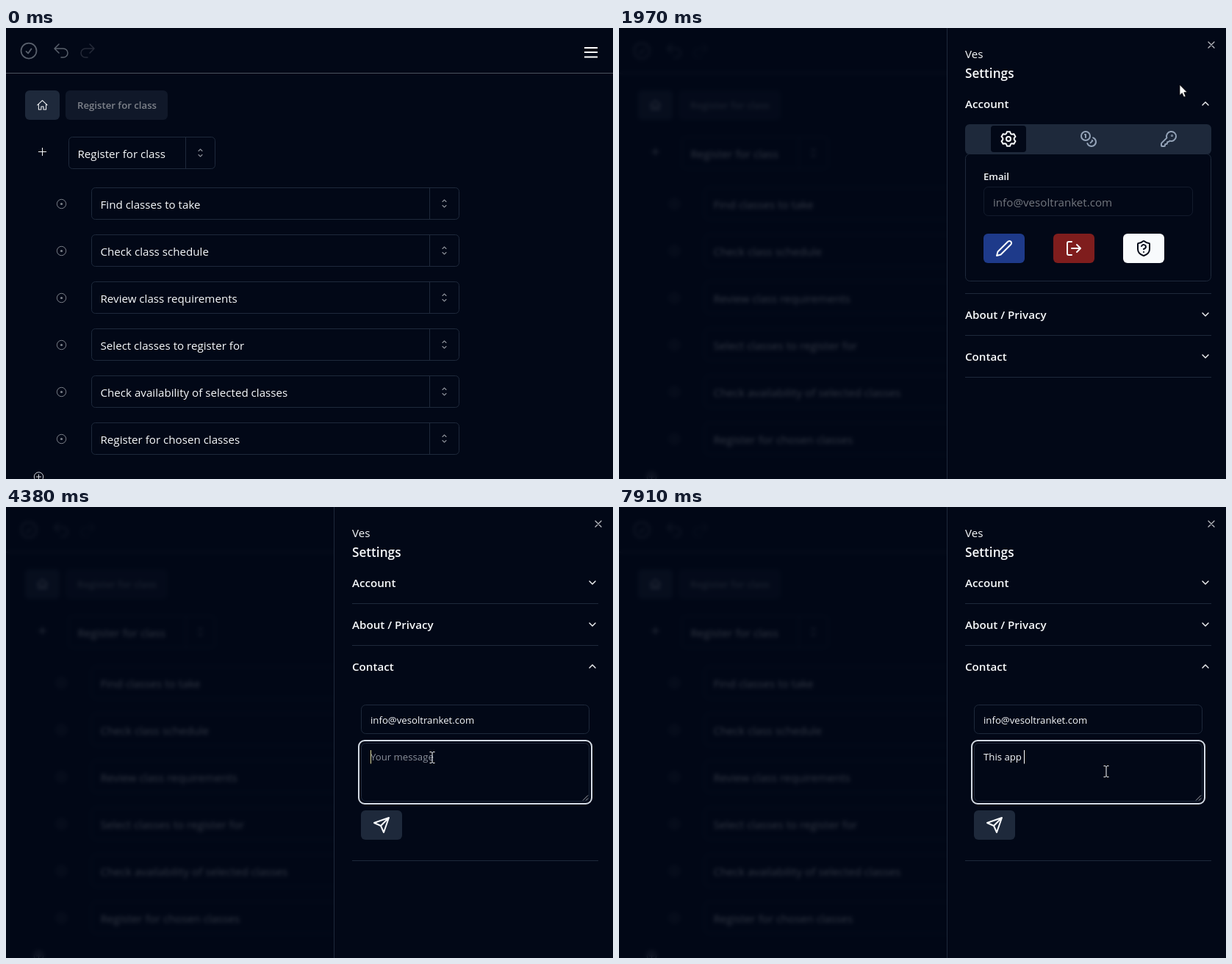
These frames come from a looping animation (826 px wide and 614 px high, 8 s). An HTML page:

```html
<!DOCTYPE html>
<html lang="en">
<head>
<meta charset="utf-8">
<title>Settings panel</title>
<style>
  html, body { margin: 0; width: 100%; height: 100%; overflow: hidden; background: #020817; }
  svg.layer, #overlay { position: absolute; left: 0; top: 0; width: 826px; height: 614px; }
  #overlay { background: rgba(2, 8, 23, .8); backdrop-filter: blur(2.5px); opacity: 0; }
  text { font: 15.15px "Open Sans", "Noto Sans", sans-serif; fill: #f8fafc; white-space: pre; }
  .bold { font-weight: 600; }
  .title { font-size: 17.2px; }
  .small { font-size: 13.2px; }
  .muted { fill: #8a909b; }
  .dim { fill: #73777f; }
  .icon { fill: none; stroke: #f8fafc; stroke-width: 2; stroke-linecap: round; stroke-linejoin: round; }
  .thin { stroke-width: 1.5; }
  .rule { fill: none; stroke: #1e293b; }
  .panel { fill: #020817; }
  .chip { fill: #1e293b; }
</style>
</head>
<body>
<svg class="layer" viewBox="0 0 826 614">
  <rect class="panel" width="826" height="614"/>
  <path d="M0 61.5H826" stroke="#4d525e"/>
  <g class="icon thin" style="stroke:#59606c">
    <path transform="translate(17 17) scale(1.167)" d="M9 12.75 11.25 15 15 9.75M21 12a9 9 0 1 1-18 0 9 9 0 0 1 18 0Z"/>
    <path transform="translate(63 19)" d="M9 15 3 9l6-6M3 9h12a6 6 0 0 1 0 12h-3"/>
    <path transform="translate(123 19) scale(-1 1)" opacity=".4" d="M9 15 3 9l6-6M3 9h12a6 6 0 0 1 0 12h-3"/>
  </g>
  <path d="M787 27H805M787 33H805M787 39.5H805" stroke="#fff" stroke-width="2"/>
  <rect class="chip" x="26" y="85" width="47" height="40" rx="6"/>
  <path class="icon thin" transform="translate(41.3 96.8) scale(.68)" d="M2.2 12 12 2.7 21.8 12M4.5 9.8V21h5.2v-6h4.6v6h5.2V9.8"/>
  <g opacity=".5">
    <rect class="chip" x="81" y="85" width="139" height="40" rx="6"/>
    <text class="bold small" x="97" y="110">Register for class</text>
  </g>
  <path d="M44 168.5H55M49.5 163V174" stroke="#f8fafc"/>
  <g id="rows"></g>
  <g fill="none" stroke="#d5d8dd">
    <circle cx="44.5" cy="611" r="6.2"/>
    <path d="M41 611H48M44.5 607.5V614"/>
  </g>
</svg>

<div id="overlay"></div>

<svg class="layer" viewBox="0 0 826 614">
  <defs>
    <clipPath id="accountClip"><rect id="accountBody" x="446" y="131" width="380" height="230"/></clipPath>
    <clipPath id="contactClip"><rect id="contactBody" x="446" y="245" width="380" height="236"/></clipPath>
    <path id="chevron" class="icon" d="M-4-2 0 2 4-2" style="stroke-width:1.4"/>
    <path id="arrow" d="M0 0V14.6L3.3 11.5 5.7 17 8.2 15.9 5.9 10.6H10.3Z" fill="#fff" stroke="#000" stroke-width=".8"/>
    <path id="hand" d="M-1.5 1.2a1.5 1.5 0 0 1 3 0V8.2c.4-1.6 2.9-1.4 3 .3.5-1.2 2.8-1 2.9.6.6-1 2.8-.8 2.9 1V14.5c0 2-1.3 3.3-1.5 6H0C-.5 18-3.6 15.2-5 12.2c-.8-1.8 1.4-2.8 2.4-1.4l1.1 1.6z" fill="#fff" stroke="#000" stroke-width=".8"/>
    <path id="beam" d="M-3.5-7.5h2.5l1 1 1-1h2.5M0-7V7M-3.5 7.5h2.5l1-1 1 1h2.5" fill="none" stroke="#fff"/>
  </defs>
  <g id="sheet">
    <rect class="panel" x="446" width="380" height="614"/>
    <path class="rule" d="M446.5 0V614"/>
    <path class="icon" d="M802 19l8 8M810 19l-8 8" style="stroke-width:1.3" opacity=".75"/>
    <text x="471" y="41">Ves</text>
    <text class="bold title" x="471" y="68">Settings</text>
    <text class="bold" x="471" y="109">Account</text>
    <g transform="translate(798 103)"><use id="accountChevron" href="#chevron"/></g>

    <g clip-path="url(#accountClip)">
      <rect class="chip" x="471" y="131" width="335" height="41" rx="6"/>
      <rect class="panel" x="506" y="133" width="48" height="36" rx="4"/>
      <g class="icon" transform="translate(530 151)"><path id="gear"/><circle r="3"/></g>
      <g class="icon" style="stroke:#94a3b8">
        <g transform="translate(627 139)">
          <circle cx="8" cy="8" r="6"/>
          <path d="M18.09 10.37A6 6 0 1 1 10.34 18M7 6h1v4M16.71 13.88l.7.71-2.82 2.82"/>
        </g>
        <g transform="translate(736 139)">
          <path d="M2.6 17.4A2 2 0 0 0 2 18.8V21a1 1 0 0 0 1 1h3a1 1 0 0 0 1-1v-1a1 1 0 0 1 1-1h1a1 1 0 0 0 1-1v-1a1 1 0 0 1 1-1h.2a2 2 0 0 0 1.4-.6l.8-.8a6.5 6.5 0 1 0-4-4z"/>
          <circle cx="16.5" cy="7.5" r=".5"/>
        </g>
      </g>
      <rect class="rule panel" x="471.5" y="171.5" width="334" height="173" rx="6" style="fill:#020817"/>
      <text class="bold small" x="496" y="207">Email</text>
      <rect class="rule" x="496.5" y="216.5" width="284" height="39" rx="6" opacity=".6"/>
      <text class="dim" x="509" y="243">info@vesoltranket.com</text>
      <rect x="496" y="280" width="56" height="40" rx="6" fill="#1e3a8a"/>
      <rect x="591" y="280" width="56" height="40" rx="6" fill="#7f1d1d"/>
      <rect x="686" y="280" width="56" height="40" rx="6" fill="#f8fafc"/>
      <g class="icon">
        <path transform="translate(512 288)" d="M17 3a2.85 2.83 0 1 1 4 4L7.5 20.5 2 22l1.5-5.5Z"/>
        <path transform="translate(607 288)" d="M9 21H5a2 2 0 0 1-2-2V5a2 2 0 0 1 2-2h4M16 17l5-5-5-5M21 12H9"/>
        <path transform="translate(702 288)" stroke="#020817" style="stroke:#020817" d="M20 13c0 5-3.5 7.5-7.7 9a1 1 0 0 1-.6 0C7.5 20.5 4 18 4 13V6a1 1 0 0 1 1-1c2 0 4.5-1.2 6.2-2.7a1.2 1.2 0 0 1 1.6 0C14.5 3.8 17 5 19 5a1 1 0 0 1 1 1zM9.1 9a3 3 0 0 1 5.8 1c0 2-3 3-3 3M12 17h.01"/>
      </g>
    </g>

    <g id="lower">
      <path class="rule" d="M471 131.5H806M471 188.5H806"/>
      <text id="about" class="bold" x="471" y="166">About / Privacy</text>
      <use href="#chevron" x="798" y="160"/>
      <text id="contact" class="bold" x="471" y="223">Contact</text>
      <g transform="translate(798 217)"><use id="contactChevron" href="#chevron"/></g>
      <g clip-path="url(#contactClip)">
        <rect class="rule" x="483.5" y="269.5" width="310" height="39" rx="6"/>
        <text class="small" x="496" y="295">info@vesoltranket.com</text>
        <rect class="rule" x="483.5" y="321.5" width="310" height="79" rx="6"/>
        <rect id="ring" x="480" y="318" width="317" height="86" rx="8" fill="none" stroke="#d3dae3" stroke-width="2"/>
        <path d="M785 399.5l7-7M789 399.5l3-3" stroke="#a5a8ae"/>
        <text id="message" class="small" x="496" y="345"></text>
        <path id="caret" d="M.5 331V349.5" stroke="#fff"/>
        <rect class="chip" x="483" y="413" width="56" height="40" rx="6"/>
        <path class="icon" transform="translate(499 421)" d="m22 2-7 20-4-9-9-4ZM22 2 11 13"/>
      </g>
      <path id="bottomRule" class="rule" d="M471 245.5H806"/>
    </g>
  </g>
  <g id="cursor"><use id="pointer" href="#arrow"/></g>
</svg>

<script>
const LOOP = 8000;
const $ = id => document.getElementById(id);

// Task fields
const field = (x, y, w, label) => `
  <rect class="rule" x="${x + .5}" y="${y + .5}" width="${w - 1}" height="43" rx="5"/>
  <path class="rule" d="M${x + w - 40.5} ${y}v44"/>
  <path class="icon" style="stroke:#8a8f98;stroke-width:1.1"
    d="M${x + w - 23} ${y + 19.5}l2.5-2.5 2.5 2.5m-5 5l2.5 2.5 2.5-2.5"/>
  <text x="${x + 12.5}" y="${y + 29}">${label}</text>`;
const tasks = ['Find classes to take', 'Check class schedule', 'Review class requirements',
  'Select classes to register for', 'Check availability of selected classes', 'Register for chosen classes'];
$('rows').innerHTML = field(85, 148, 200, 'Register for class') + tasks.map((label, i) => {
  const y = 217 + 64 * i;
  return field(116, y, 501, label) + `
    <circle cx="75.5" cy="${y + 22.5}" r="6.2" fill="none" stroke="#7c818a"/>
    <circle cx="75.5" cy="${y + 22.5}" r="1.6" fill="#7c818a"/>`;
}).join('');

const toothProfile = [[10, -12], [10, 12], [7.8, 22], [7.8, 38]];
$('gear').setAttribute('d', 'M' + [0, 1, 2, 3, 4, 5].flatMap(k => toothProfile.map(([r, deg]) => {
  const a = (deg + 60 * k - 90) * Math.PI / 180;
  return (r * Math.cos(a)).toFixed(2) + ' ' + (r * Math.sin(a)).toFixed(2);
})).join('L') + 'Z');

// Bursts of screen updates: first, last, count
const bursts = [[190, 960, 12], [1420, 2180, 12], [2260, 2780, 9], [3200, 3960, 11], [4030, 4380, 6], [4640, 4840, 4]];
function snap(t) {
  let shown = 0;
  for (const [first, last, count] of bursts) {
    if (t < first) break;
    const step = (last - first) / (count - 1);
    shown = first + step * Math.min(count - 1, Math.floor((t - first) / step + 1e-6));
  }
  return shown;
}

function track(id, prop, steps) {
  const frames = steps.map(([at, value, easing = 'linear']) => ({ offset: at / LOOP, [prop]: value, easing }));
  frames.unshift({ ...frames[0], offset: 0, easing: 'linear' });
  frames.push({ ...frames[frames.length - 1], offset: 1 });
  const animation = $(id).animate(frames, { duration: LOOP, fill: 'both' });
  animation.pause();
  return animation;
}
const tween = (id, prop, from, to, start, length, easing) =>
  track(id, prop, [[start, from, easing], [start + length, to]]);
const fold = (id, prop, from, to) => tween(id, prop, from, to, 3180, 200, 'ease-out');

const path = [
  [189, 757, 640], [190, 757, 596], [400, 768, 430], [680, 790, 180], [890, 799, 60], [960, 800, 40],
  [1780, 800, 40], [1980, 740, 100], [2180, 628, 238], [2260, 616, 262], [2480, 580, 360], [2640, 560, 425],
  [2780, 556, 443], [3520, 556, 443], [3700, 572, 400], [3960, 587, 306], [4030, 588, 312],
  [4240, 580, 341], [4570, 580, 341], [4640, 602, 346], [4840, 663, 360]];

const animations = [
  track('cursor', 'transform', path.map(([at, x, y]) => [at, `translate(${x}px, ${y}px)`])),
  tween('overlay', 'opacity', 0, 1, 1382, 70),
  tween('sheet', 'transform', 'translate(381px, 0px)', 'translate(0px, 0px)', 1406, 470, 'ease'),
  fold('accountBody', 'height', '230px', '0px'),
  fold('contactBody', 'height', '0px', '236px'),
  fold('lower', 'transform', 'translate(0px, 230px)', 'translate(0px, 0px)'),
  fold('bottomRule', 'transform', 'translate(0px, 0px)', 'translate(0px, 236px)'),
  fold('accountChevron', 'transform', 'rotate(180deg)', 'rotate(0deg)'),
  fold('contactChevron', 'transform', 'rotate(0deg)', 'rotate(180deg)'),
];

const pointers = [[0, 'arrow'], [885, 'hand'], [1400, 'arrow'], [2480, 'hand'], [3260, 'arrow'], [3650, 'beam']];
const typed = 'This app\u00a0'.replace(' ', '\u00a0');
const keyTimes = [5440, 5970, 6060, 6150, 6240, 7180, 7440, 7640, 7910];
const within = (t, from, to) => t >= from && t < to;
const show = (id, on) => $(id).style.visibility = on ? 'visible' : 'hidden';
const underline = (id, on) => $(id).style.textDecoration = on ? 'underline' : 'none';

function render(t) {
  const shown = snap(t);
  for (const animation of animations) animation.currentTime = shown;

  const [, kind] = pointers.filter(([at]) => at <= shown).pop();
  $('pointer').setAttribute('href', '#' + kind);
  underline('about', within(shown, 2480, 2610));
  underline('contact', within(shown, 2610, 3200));

  const count = keyTimes.filter(at => at <= t).length;
  const message = $('message');
  message.textContent = count ? typed.slice(0, count) : 'Your message';
  message.classList.toggle('muted', !count);
  const caretX = 496 + (count ? Math.round(message.getComputedTextLength()) : 0);
  $('caret').setAttribute('transform', `translate(${caretX} 0)`);
  $('caret').setAttribute('stroke', count ? '#fff' : '#dcd69a');
  show('caret', t >= 4310 && !within(t, 4840, 5380) && !within(t, 6780, 7180));
  show('ring', t >= 4310);
}

const start = performance.now();
function tick() {
  render((performance.now() - start) % LOOP);
  requestAnimationFrame(tick);
}
tick();
</script>
</body>
</html>
```
